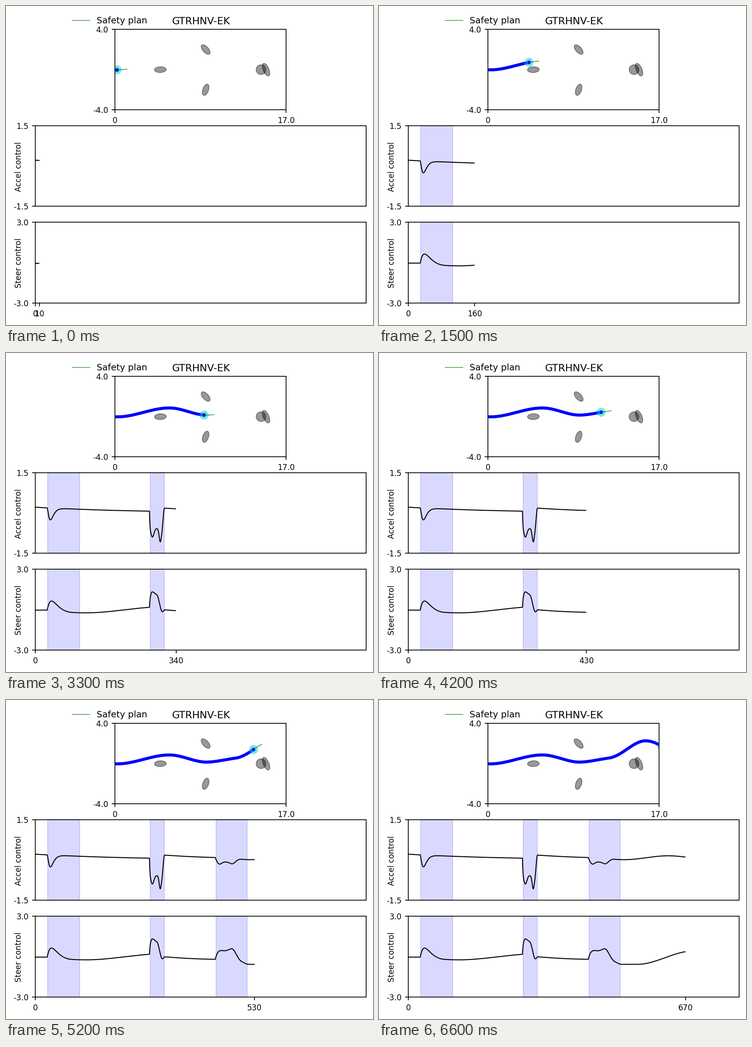
Recreate the animation shown at these times as a matplotlib script. Size 802x698 px, loop 6700 ms.

```python
import numpy as np
import matplotlib.pyplot as plt
from matplotlib.animation import FuncAnimation
from matplotlib.patches import Circle, Ellipse, Rectangle

W, H, DPI = 802, 698, 100
FRAMES, STEP = 67, 10
PT = 72 / DPI                      # points per pixel

MAP = (238.3, 51.3, 612.3, 227.3)  # left, top, right, bottom
ACC = (64.3, 262.3, 787.3, 438.3)
STR = (64.3, 473.4, 787.3, 649.6)
UNIT = 22.0                        # pixels per map unit
MID = (MAP[1] + MAP[3]) / 2        # map y = 0
HALF = 0.4                         # pixel-centre offset
TICK_FS, LEGEND_FS, TITLE_FS = 12.25, 14, 15.75
CYAN, BLUE = (0, 0.8, 0.83), (0, 0, 1)
SHADES = [(91, 161), (315, 345.8), (458.7, 526.7)]


def ease(x, a, b):
    t = np.clip((x - a) / (b - a), 0, 1)
    return t * t * (3 - 2 * t)


def rise(x, a, tau):
    return 1 - np.exp(-np.maximum(x - a, 0) / tau)


def bump(x, mid, width):
    return np.exp(-0.5 * ((x - mid) / width) ** 2)


def pulse(x, a, width, power):
    """Sharp onset at a, peak of 1 at a + width, slow decay."""
    u = np.maximum(x - a, 0) / width
    return (u * np.exp(1 - u)) ** power


def arc(x, a, b, y0, y1, bulge=0):
    t = (x - a) / (b - a)
    return y0 + (y1 - y0) * t + bulge * np.sin(np.pi * t)


# Curves in stage pixels: calm drifts, broken by the safety filter
def accel(x):
    start = arc(x, 64, 90, 337, 338.5)
    dodge1 = arc(x, 90, 313.5, 338.5, 345.7, 0.9) + 26 * pulse(x, 90, 7, 1.8)
    dodge2 = (arc(x, 313.5, 346.3, 345.7, 339)
              + 41 * rise(x, 313.5, 1) * (1 - ease(x, 340.5, 346.3))
              + 17 * bump(x, 320, 3.2) * rise(x, 313.5, 1)
              + 31 * bump(x, 337.2, 2.5))
    cruise = arc(x, 346.3, 457.5, 339, 344.3, 0.6)
    dodge3 = (arc(x, 457.5, 512, 344.3, 348.2)
              + rise(x, 457.5, 3) * (8 * (1 - ease(x, 494, 512))
                                     + 6.5 * bump(x, 466, 5)
                                     + 3.2 * bump(x, 494, 5)))
    tail = 344.75 + 4.25 * np.cos(np.pi * (x - 535) / 97)
    return np.select([x < 90, x < 313.5, x < 346.3, x < 457.5, x < 512],
                     [start, dodge1, dodge2, cruise, dodge3], tail)


def steer(x):
    dodge1 = (562.2 + 6 * ease(x, 90, 140) - 20.5 * pulse(x, 90, 10, 1.1)
              - 13 * ease(x, 175, 340))
    dodge2 = (556 - 36 * rise(x, 313.5, 2) + 0.85 * np.maximum(x - 319, 0)
              + 27 * ease(x, 330, 341) - 8 * ease(x, 341, 347))
    cruise = arc(x, 346.3, 457.5, 561.5, 567, 1)
    dodge3 = (567 - rise(x, 457.5, 4) * (18.5 + 2 * bump(x, 467, 5))
              - 4.5 * bump(x, 493, 6)
              + 23 * ease(x, 494, 516) + 6 * ease(x, 512, 528))
    tail = 578 - 29 * ease(x, 565, 685)
    return np.select([x < 313.5, x < 346.3, x < 457.5, x < 528],
                     [dodge1, dodge2, cruise, dodge3], tail)


def path_y(x):
    return (MID - 19.4 * ease(x, 244, 356) + 15.6 * ease(x, 358, 438)
            - 10 * ease(x, 437, 520) - 36.6 * ease(x, 502, 582)
            + 0.0098 * np.maximum(x - 582, 0) ** 2 + HALF)


def car_x(step):
    return np.interp(step, [10, 90, 430, 670], [242.7, 287, 485.5, 618.5])


def px(step):
    return ACC[0] + (ACC[2] - ACC[0]) * step / 800


fig = plt.figure(figsize=(W / DPI, H / DPI), dpi=DPI, facecolor="white")
ax = fig.add_axes([0, 0, 1, 1])
ax.set_xlim(0, W)
ax.set_ylim(H, 0)
ax.axis("off")


def line(x, y, color, width, z, **kw):
    return ax.plot(x, y, color=color, lw=width * PT, zorder=z, **kw)[0]


def label(x, y, s, size=TICK_FS, **kw):
    return ax.text(x, y, s, fontsize=size, family="DejaVu Sans",
                   va="baseline", **kw)


def panel(box, top, bottom):
    x0, y0, x1, y1 = box
    ax.add_patch(Rectangle((x0, y0), x1 - x0, y1 - y0, fill=False,
                           ec="black", lw=1.7 * PT, zorder=8))
    for y, s in ((y0, top), (y1, bottom)):
        line([x0 - 7, x0], [y, y], "black", 1.7, 8, solid_capstyle="butt")
        label(x0 - 14.8, y + 7, s, ha="right")


def x_tick(x, y, s):
    mark = line([x, x], [y, y + 7], "black", 1.7, 8, solid_capstyle="butt")
    return mark, label(x, y + 29.2, s, ha="center")


panel(MAP, "4.0", "-4.0")
panel(ACC, "1.5", "-1.5")
panel(STR, "3.0", "-3.0")
x_tick(MAP[0], MAP[3], "0")
x_tick(MAP[2], MAP[3], "17.0")
x_tick(STR[0], STR[3], "0")
now_mark, now_text = x_tick(STR[0], STR[3], "")

for y, s in ((351.5, "Accel control"), (562.5, "Steer control")):
    label(32.6, y, s, ha="center", rotation=90, rotation_mode="anchor")
label(426, 39.5, "GTRHNV-EK", TITLE_FS, ha="center")
label(198, 38, "Safety plan", LEGEND_FS, ha="left")
line([144, 183], [31, 31], "green", 1.1, 5)

# Obstacles: map x, map y, width, height (pixels), tilt
for mx, my, w, h, tilt in ((4.5, 0, 25.6, 12.6, -2), (9, 2, 25.6, 12.6, 48),
                           (9, -2, 25.6, 12.6, -71), (15, 0, 29.4, 12.6, 67),
                           (14.5, 0, 21.2, 21.2, 0)):
    ax.add_patch(Ellipse((MAP[0] + mx * UNIT, MID - my * UNIT), w, h,
                         angle=tilt, fc="black", ec="black", alpha=0.4,
                         lw=1.8 * PT, zorder=2))

window = Rectangle(MAP[:2], MAP[2] - MAP[0], MAP[3] - MAP[1],
                   transform=ax.transData)
trail = line([], [], "blue", 6.6, 3, solid_capstyle="round")
plan = line([], [], "green", 1.2, 6)
rings = [ax.add_patch(Circle((0, 0), r, alpha=0.42, lw=1.8 * PT, zorder=4))
         for r in (9, 5)]
core = ax.add_patch(Circle((0, 0), 3.6, fc="blue", lw=0, zorder=5))
for part in (trail, plan, core, *rings):
    part.set_clip_path(window)

curves = [(line([], [], "black", 2.1, 5), f) for f in (accel, steer)]
bands = [[ax.add_patch(Rectangle((a, box[1]), 0, box[3] - box[1], fc="blue",
                                 ec="blue", alpha=0.15, lw=2 * PT, zorder=1))
          for box in (ACC, STR)] for a, _ in SHADES]


def draw(frame):
    step = STEP * (frame + 1)
    head = px(step - 1)

    # Control plots
    xs = np.arange(ACC[0], head + 0.01, 0.4)
    for curve, f in curves:
        curve.set_data(xs, f(xs) + HALF)
    active = False
    for (a, b), pair in zip(SHADES, bands):
        active |= a <= head <= b
        for band in pair:
            band.set_visible(head >= a)
            band.set_width(max(0, min(head, b) - a))
    now_mark.set_xdata([px(step)] * 2)
    now_text.set_x(px(step))
    now_text.set_text(str(step))

    # Car, its trail and the plan ahead
    cx = car_x(step)
    cy = path_y(cx)
    xs = np.linspace(MAP[0], cx, 200)
    trail.set_data(xs, path_y(xs))
    for ring in rings:
        ring.set_center((cx, cy))
        ring.set_color(BLUE if active else CYAN)
    core.set_center((cx, cy))
    slope = path_y(cx + 0.5) - path_y(cx - 0.5)
    xs = np.linspace(cx, cx + 22 / np.hypot(1, slope), 12)
    plan.set_data(xs, path_y(xs))
    return []


anim = FuncAnimation(fig, draw, frames=FRAMES, interval=100,
                     repeat=True, repeat_delay=0, blit=False)
plt.show()
```
